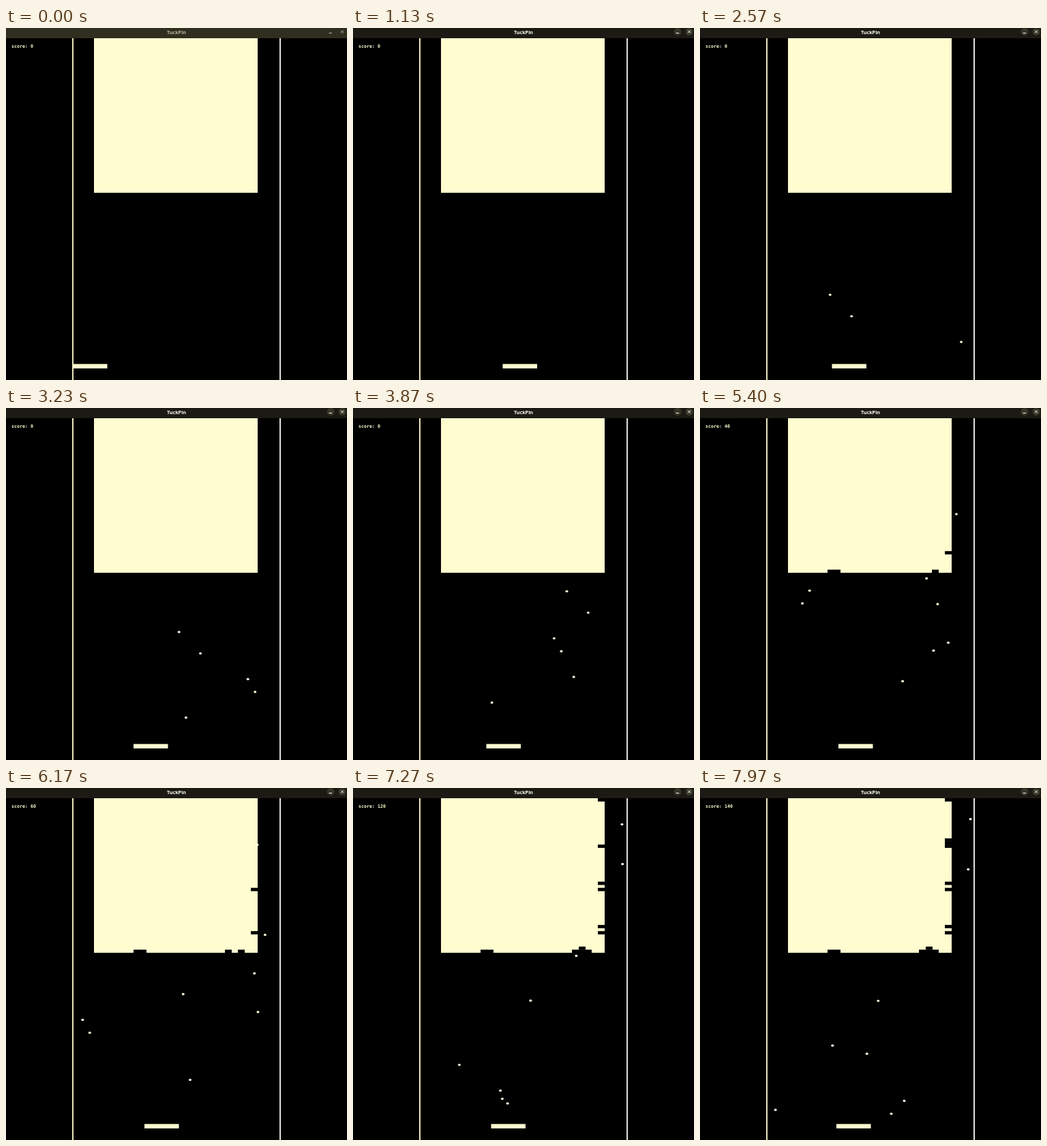
These frames come from a looping animation (500x517 px, 8 s). An HTML page with a canvas:

```html
<!DOCTYPE html>
<html lang="en">
<head>
<meta charset="utf-8">
<title>TuckPin</title>
<style>
  html, body { margin: 0; width: 100%; height: 100%; overflow: hidden; background: #000; }
  canvas { display: block; }
</style>
</head>
<body>
<canvas id="stage" width="500" height="517"></canvas>
<script>
const ctx = document.getElementById('stage').getContext('2d');
const LOOP = 8000, SUB = 32, STEP = 3.147 / SUB;
const CREAM = '#fffcd0';
const COLS = 25, ROWS = 50, BX = 129, BY = 15, BW = 9.6, BH = 4.54;
const HIT_W = 9.555, HIT_H = 4.506;   // balls sink slightly into a brick
const LEFT = 100.2, RIGHT = 400.38, TOP = 16.45, FLOOR = 494.5, START_Y = 467.4;
const PAD_W = 50.5, PAD_SPEED = 7.25, FOCUS = 10;

// launches: frame, x
const LAUNCHES = [[53, 115.2], [63, 178.1], [75, 376.7], [81, 385.1],
  [93, 251.3], [105, 169], [123, 241.3], [141, 231]];

// where the player steers to: frame, left edge
const GOALS = [[10, 239], [30, 219.5], [44, 205], [60, 193.5], [86, 187], [100, 195.5],
  [150, 203], [198, 169], [212, 202.5], [230, 218.5], [235, 200]];

let frame, balls, gone, pad;

function reset() {
  frame = 0;
  balls = [];
  gone = new Set();
  pad = 98;
}

function hitBrick(x, y) {
  const c = Math.floor((x - BX) / HIT_W), r = Math.floor((y - BY) / HIT_H);
  if (c < 0 || c >= COLS || r < 0 || r >= ROWS) return false;
  const id = r * COLS + c;
  if (gone.has(id)) return false;
  gone.add(id);
  return true;
}

function move(b) {
  const nx = b.x + b.vx * STEP;
  if (nx < LEFT || nx > RIGHT || hitBrick(nx, b.y)) b.vx = -b.vx;
  b.x += b.vx * STEP;

  const ny = b.y + b.vy * STEP;
  if (ny > FLOOR) {
    b.vy = -1;
    b.vx = (b.x - pad) / (PAD_W / 2) - 1;   // steeper near the paddle's middle
  } else if (ny < TOP || hitBrick(b.x, ny)) {
    b.vy = -b.vy;
  }
  b.y += b.vy * STEP;
}

function steer() {
  const goal = GOALS.filter(g => g[0] <= frame).pop();
  if (!goal) return;
  const gap = goal[1] - pad;
  pad += Math.sign(gap) * Math.min(Math.abs(gap), PAD_SPEED);
}

function advance() {
  frame++;
  steer();
  for (let i = 0; i < SUB; i++) balls.forEach(move);
  for (const [start, x] of LAUNCHES) {
    if (start === frame) balls.push({ x, y: START_Y, vx: 1, vy: -1 });
  }
}

function rect(x, y, w, h, color) {
  ctx.fillStyle = color;
  ctx.fillRect(x, y, w, h);
}

function oval(x, y, rx, ry, color) {
  ctx.fillStyle = color;
  ctx.beginPath();
  ctx.ellipse(x, y, rx, ry, 0, 0, 7);
  ctx.fill();
}

function label(str, x, y, font, align, color) {
  ctx.font = font;
  ctx.textAlign = align;
  ctx.fillStyle = color;
  ctx.fillText(str, x, y);
}

function drawTitleBar() {
  const on = frame >= FOCUS, ink = on ? '#fffff4' : '#b9b6a0';
  rect(0, 0, 500, 15, on ? '#1b1a14' : '#302e1e');
  label('TuckPin', 250, 8.5, 'bold 7.2px "Open Sans", "Noto Sans", sans-serif', 'center', ink);
  if (on) for (const x of [476, 493]) oval(x, 5.5, 5.5, 5.5, '#383628');
  ctx.strokeStyle = ink;
  ctx.lineWidth = 1;
  ctx.beginPath();
  ctx.moveTo(473.5, 7.5); ctx.lineTo(478, 7.5);
  ctx.moveTo(491, 3.5); ctx.lineTo(495, 7.5);
  ctx.moveTo(495, 3.5); ctx.lineTo(491, 7.5);
  ctx.stroke();
}

function draw() {
  rect(0, 0, 500, 517, '#000');
  drawTitleBar();
  label('score: ' + gone.size * 10, 8, 29,
    'bold 6.65px "DejaVu Sans Mono", monospace', 'left', CREAM);

  rect(97, 15, 2, 502, '#e8e5bc');
  rect(401, 15, 2, 502, '#e2e2e2');

  rect(BX, BY, COLS * BW, ROWS * BH, CREAM);
  for (const id of gone) {
    const x = Math.round(BX + id % COLS * BW);
    const y = BY + Math.floor(id / COLS) * BH;
    rect(x, y, Math.round(BW), BH + .3, '#000');
  }

  rect(pad, 493.5, PAD_W, 6.5, CREAM);
  for (const b of balls) oval(b.x, b.y, 2, 1.7, '#ffffe0');
}

function tick(now) {
  const tens = Math.floor(now % LOOP / 10);
  const f = Math.ceil(.3 * tens + .15) - 1;   // 30 frames a second on a 10 ms clock
  if (f < frame) reset();
  while (frame < f) advance();
  draw();
  requestAnimationFrame(tick);
}

reset();
requestAnimationFrame(tick);
</script>
</body>
</html>
```
